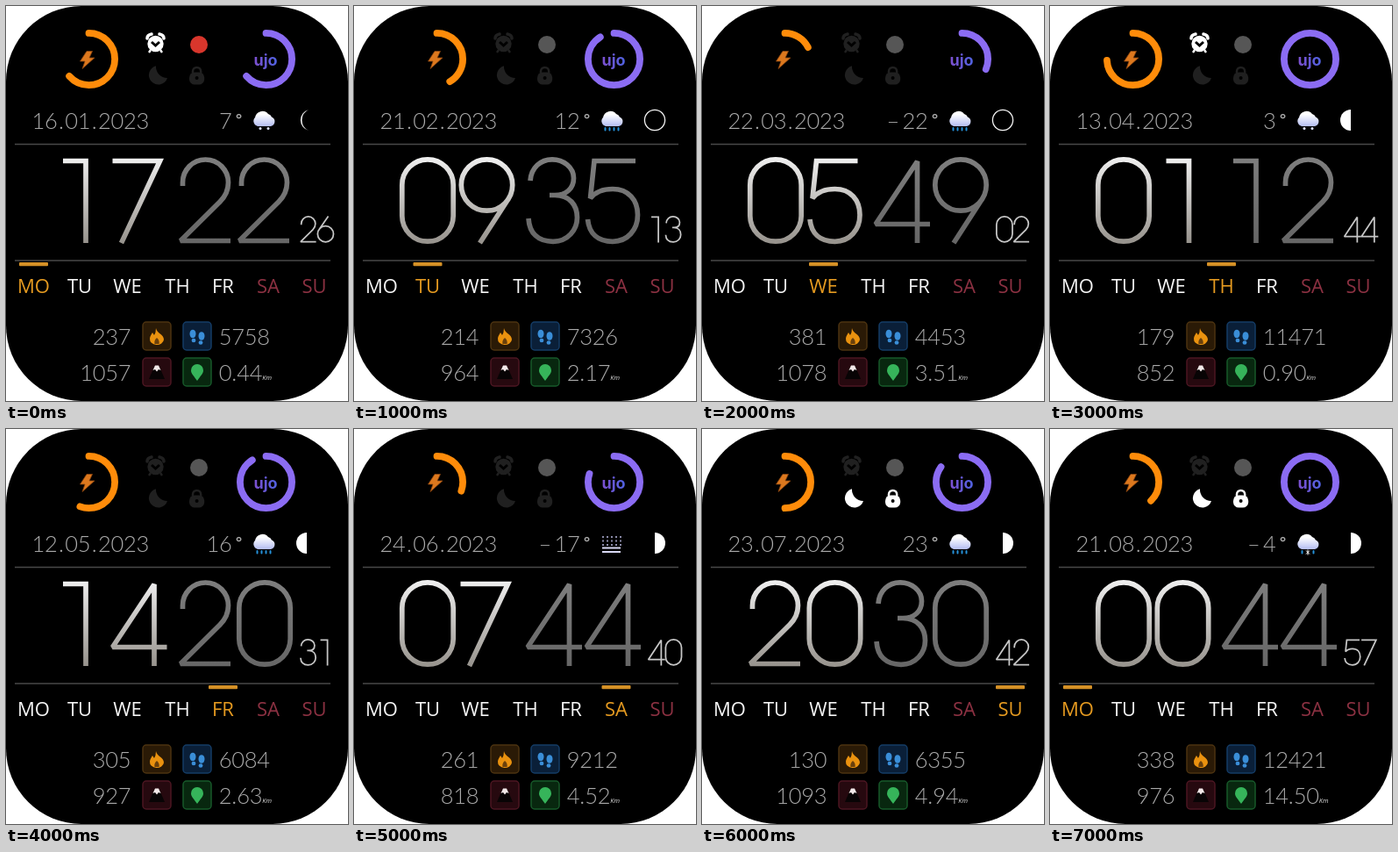
Recreate the animation shown at these times as an HTML page. Size 390x450 px, loop 8000 ms.

```html
<!DOCTYPE html>
<html lang="en">
<head>
<meta charset="utf-8">
<title>Watch face</title>
<style>
html, body { margin: 0; width: 100%; height: 100%; overflow: hidden; background: #fff; }
svg { display: block; width: 390px; height: 450px; }
.num { font: 300 25.5px Lato, sans-serif; fill: #a9a9a9; text-anchor: middle; }
.degree { font-size: 17px; font-weight: 700; }
.day { font: 500 22px "Open Sans", "Noto Sans", sans-serif; fill: #f6f6f6; text-anchor: middle; }
.day.rest { fill: #8c3142; }
.day.on { fill: #e59a20; }
.unit { font: italic 500 7.5px "Open Sans", sans-serif; fill: #ddd; }
.word { font: 700 18px Inter, sans-serif; fill: url(#violet); text-anchor: middle; }
.ring { fill: none; stroke-width: 7.8; stroke-linecap: round; }
.big { fill: none; stroke-width: 5.7; stroke-miterlimit: 2; }
.icon { color: #202020; }
.icon.on { color: #fff; }
#link { fill: #565656; }
#link.on { fill: #d8362c; }
</style>
</head>
<body>
<svg viewBox="0 0 390 450">
  <defs>
    <linearGradient id="hour" gradientUnits="userSpaceOnUse" x1="0" y1="0" x2="0" y2="99">
      <stop stop-color="#f0f0f0"/><stop offset="1" stop-color="#96928c"/>
    </linearGradient>
    <linearGradient id="minute" gradientUnits="userSpaceOnUse" x1="0" y1="0" x2="0" y2="99">
      <stop stop-color="#7e7e7e"/><stop offset="1" stop-color="#666"/>
    </linearGradient>
    <linearGradient id="violet">
      <stop stop-color="#7d4fcf"/><stop offset="1" stop-color="#4f62e0"/>
    </linearGradient>
    <linearGradient id="cloud" x2="0" y2="1">
      <stop offset=".2" stop-color="#fff"/><stop offset="1" stop-color="#b4bdf2"/>
    </linearGradient>
  </defs>

  <rect width="390" height="450" rx="86" fill="#000"/>
  <path d="M10 157.5H370M10 290H370" stroke="#484848" stroke-width="1.3"/>

  <g transform="rotate(-90 94.5 60.5)"><circle id="power" class="ring" cx="94.5" cy="60.5" r="29.6" pathLength="360" stroke="#ff8c0a"/></g>
  <g transform="rotate(-90 296.5 60.5)"><circle id="score" class="ring" cx="296.5" cy="60.5" r="29.6" pathLength="360" stroke="#8b6cf3"/></g>
  <path d="M92 51.5L84.5 63H90L87 71.5L101 59H95L98.5 51.5Z" fill="#dc781e" stroke="#8a4410" stroke-width=".8"/>
  <text class="word" x="296" y="68">ujo</text>

  <g id="alarm" class="icon" fill="none" stroke="currentColor">
    <circle cx="170.5" cy="43" r="9.2" fill="currentColor" stroke="none"/>
    <path d="M161 37Q161 33 166 32M180 37Q180 33 175 32" stroke-width="3.6" stroke-linecap="round"/>
    <path d="M165 50L163 53M176 50L178 53" stroke-width="2.4"/>
    <path d="M166 41L170.500 45L175 41" stroke="#000" stroke-width="3"/>
  </g>
  <circle id="link" cx="220" cy="44" r="10"/>
  <path id="sleep" class="icon" fill="currentColor" d="M171 68.200A10.800 10.800 0 1 0 184 82A13 13 0 0 1 171 68.200Z"/>
  <g id="lock" class="icon">
    <path d="M213 78V74.500A4.600 4.600 0 0 1 222.200 74.500V78" fill="none" stroke="currentColor" stroke-width="2.500"/>
    <rect x="209" y="75.500" width="17.200" height="14" rx="6.300" fill="currentColor"/>
    <circle cx="217.600" cy="82" r="2" fill="#000"/>
  </g>

  <g id="live"></g>
  <rect id="mark" y="292" width="33" height="4.200" rx="1" fill="#d49026"/>
  <g id="days"></g>

  <g stroke-width="1.5">
    <rect x="156" y="360" width="32" height="32" rx="4" fill="#2a1a06" stroke="#4c3310"/>
    <rect x="202" y="360" width="32" height="32" rx="4" fill="#0a1f38" stroke="#143c66"/>
    <rect x="156" y="401" width="32" height="32" rx="4" fill="#26090f" stroke="#4c1622"/>
    <rect x="202" y="401" width="32" height="32" rx="4" fill="#08270f" stroke="#17592a"/>
  </g>
  <path d="M171 367C172 373 180 374 180 380A8 6.5 0 0 1 164 379C164 376 166 374 167 372L169 375Q171 372 171 367Z" fill="#ea920f"/>
  <path d="M172 378Q175.5 381 174.500 385H169.500Q168.500 381 172 378Z" fill="#6a400c"/>
  <g fill="#3a8ed8">
    <ellipse cx="213" cy="373.5" rx="3.5" ry="4.8"/><ellipse cx="214" cy="381" rx="2.400" ry="2.200"/>
    <ellipse cx="223" cy="376" rx="3.5" ry="4.8"/><ellipse cx="222" cy="383.5" rx="2.400" ry="2.200"/>
  </g>
  <path d="M163 425L169 411H175L181 425Z" fill="#080405"/>
  <path d="M167.5 415L170 409.5H174L176.5 415L174 414L172 416.5L170 414Z" fill="#f2e8e8"/>
  <path d="M218 427C214 421 211 419 211 415A7 7 0 0 1 225 415C225 419 222 421 218 427Z" fill="#36b45a"/>
</svg>

<script>
const $ = id => document.getElementById(id);
const HOLD = 1000;

// Thin clock numerals as strokes in a 64 x 99 cell
const GLYPHS = {
  0: 'M2.8 32a29.2 29.2 0 0 1 58.4 0V67a29.2 29.2 0 0 1-58.4 0Z',
  1: 'M13 4.5H39V98',
  2: 'M5.5 33V29A26 26 0 0 1 57.5 29C57.5 39 54 45 48 51L3 95.5H60',
  3: 'M5 27C6 12 17 2.8 30 2.8S54.5 12 54.5 24 46 43.5 33 43.5H27M33 43.5C50 43.5 58.5 55 58.5 69S48 96.3 31 96.3 4 87 3 70',
  4: 'M49.5 98V5L2 76.5H64',
  5: 'M58 4.5H11L6.5 47C13 39 22 36.5 32 36.5 50 36.5 60.5 49 60.5 66S49 96.3 32 96.3 5 87 3.5 71',
  6: 'M42 2L8 51M2.8 67a29.2 29.2 0 1 0 58.4 0a29.2 29.2 0 1 0-58.4 0',
  7: 'M2 4.5H56L12 98',
  9: 'M2.8 32a29.2 29.2 0 1 0 58.4 0a29.2 29.2 0 1 0-58.4 0M57 47L24 98'
};

const DAYS = [['MO', 31.5], ['TU', 84], ['WE', 138.5], ['TH', 195.5], ['FR', 247.5], ['SA', 299], ['SU', 351.5]];

// date, clock, temperature, weather, moon, power and score angles, lit icons, four readings
const STATES = [
  ['16.01', '172226', 7, 'snow', 'crescent', 229, 229, 'alarm link', 237, 5758, 1057, '0.44'],
  ['21.02', '093513', 12, 'rain', 'new', 150, 328, '', 214, 7326, 964, '2.17'],
  ['22.03', '054902', -22, 'rain', 'new', 63, 113, '', 381, 4453, 1078, '3.51'],
  ['13.04', '011244', 3, 'snow', 'left', 267, 360, 'alarm', 179, 11471, 852, '0.90'],
  ['12.05', '142031', 16, 'rain', 'left', 200, 328, '', 305, 6084, 927, '2.63'],
  ['24.06', '074440', -17, 'mist', 'right', 110, 289, '', 261, 9212, 818, '4.52'],
  ['23.07', '203042', 23, 'rain', 'right', 180, 306, 'sleep lock', 130, 6355, 1093, '4.94'],
  ['21.08', '004457', -4, 'sleet', 'right', 136, 360, 'sleep lock', 338, 12421, 976, '14.50']
];

const STEP = 14.5;
const LEFT_END = 142.4;
const RIGHT_START = 242.8;

// Fixed-pitch figures starting at x; a dot takes its own pitch
function figures(value, x, y, dot = 6) {
  const xs = [];
  for (const c of String(value)) {
    const w = c === '.' ? dot : STEP;
    xs.push(x + w / 2);
    x += w;
  }
  return `<text class="num" x="${xs.join(' ')}" y="${y}">${value}</text>`;
}

const figuresEnd = (value, x, y) => figures(value, x - STEP * String(value).length, y);

function temperature(t) {
  const digits = String(Math.abs(t));
  const minus = 250.5 - STEP * (digits.length - 1) - 18;
  return figuresEnd(digits, 257.6, 140) + '<text class="num degree" x="265.5" y="134.5">°</text>' +
    (t < 0 ? `<text class="num" x="${minus}" y="140">–</text>` : '');
}

function clock(time) {
  const place = [[52, 172, 1], [119.5, 172, 1], [196, 172, 1], [263, 172, 1], [335, 239, .31], [354.5, 239, .31]];
  const paint = ['url(#hour)', 'url(#minute)', '#c6c6c6'];
  return place.map(([x, y, s], i) =>
    `<path class="big" d="${GLYPHS[time[i]]}" stroke="${paint[i >> 1]}" transform="translate(${x} ${y}) scale(${s})"/>`).join('');
}

const CLOUD = '<path d="M287 137A6 6 0 0 1 284 127A8.5 8.5 0 0 1 299 123A6 6 0 0 1 303 126.500A5.500 5.500 0 0 1 302 137Z" fill="url(#cloud)"/>';
const drops = (xs, color) => xs.map(x =>
  `<path d="M${x} 139V141.5" stroke="${color}" stroke-width="2" stroke-linecap="round"/>`).join('');

function mist() {
  const rows = [123, 127.5, 132].map(y => `M283 ${y}H305`).join('');
  return `<path d="${rows}" stroke="#8a8aa8" stroke-width="2" stroke-dasharray="2 3"/>` +
    '<path d="M283 135.5H304M283 140H304" stroke="#d8d8f4" stroke-width="2.2"/>';
}

const WEATHER = {
  snow: CLOUD + '<g fill="#dfe5ff"><circle cx="290" cy="139.500" r="1.5"/><circle cx="299" cy="139.500" r="1.5"/></g>',
  rain: CLOUD + drops([286.5, 291.5, 296.5, 301.5], '#2590d8'),
  sleet: CLOUD + drops([287.5, 300.5], '#2590d8') + '<path d="M292 138.5L296 142.5M296 138.5L292 142.5M294 137.5V143.5" stroke="#fff"/>',
  mist: mist()
};

const MOON = {
  new: '<circle cx="343" cy="130" r="11.6" fill="none" stroke="#f4f4f4" stroke-width="1.3"/>',
  crescent: '<path d="M345 118.2A12.2 12.2 0 0 0 345 141.8A13 13 0 0 1 345 118.2Z" fill="#fff"/>',
  left: '<path d="M343 118A12 12 0 0 0 343 142Z" fill="#fff"/>',
  right: '<path d="M343 118A12 12 0 0 1 343 142Z" fill="#fff"/>'
};

function show(i) {
  const [date, time, temp, sky, moon, power, score, lit, burn, steps, climb, km] = STATES[i];
  const day = i % 7;
  const kmEnd = RIGHT_START + 6 + STEP * (km.length - 1);
  $('live').innerHTML = figures(date + '.2023', 29.6, 140, 8.8) + temperature(temp) +
    WEATHER[sky] + MOON[moon] + clock(time) +
    figuresEnd(burn, LEFT_END, 386) + figures(steps, RIGHT_START, 386) +
    figuresEnd(climb, LEFT_END, 426.5) + figures(km, RIGHT_START, 426.5) +
    `<text class="unit" x="${kmEnd}" y="426">Km</text>`;
  $('power').setAttribute('stroke-dasharray', power + ' 400');
  $('score').setAttribute('stroke-dasharray', score + ' 400');
  for (const id of ['alarm', 'link', 'sleep', 'lock']) $(id).classList.toggle('on', lit.includes(id));
  $('mark').setAttribute('x', DAYS[day][1] - 16.5);
  [...$('days').children].forEach((el, d) => el.classList.toggle('on', d === day));
}

$('days').innerHTML = DAYS.map(([name, x], d) =>
  `<text class="day${d > 4 ? ' rest' : ''}" x="${x}" y="327">${name}</text>`).join('');

let shown = -1;
const start = performance.now();
function tick() {
  const i = Math.floor((performance.now() - start) / HOLD) % STATES.length;
  if (i !== shown) show(shown = i);
  requestAnimationFrame(tick);
}
tick();
</script>
</body>
</html>
```
